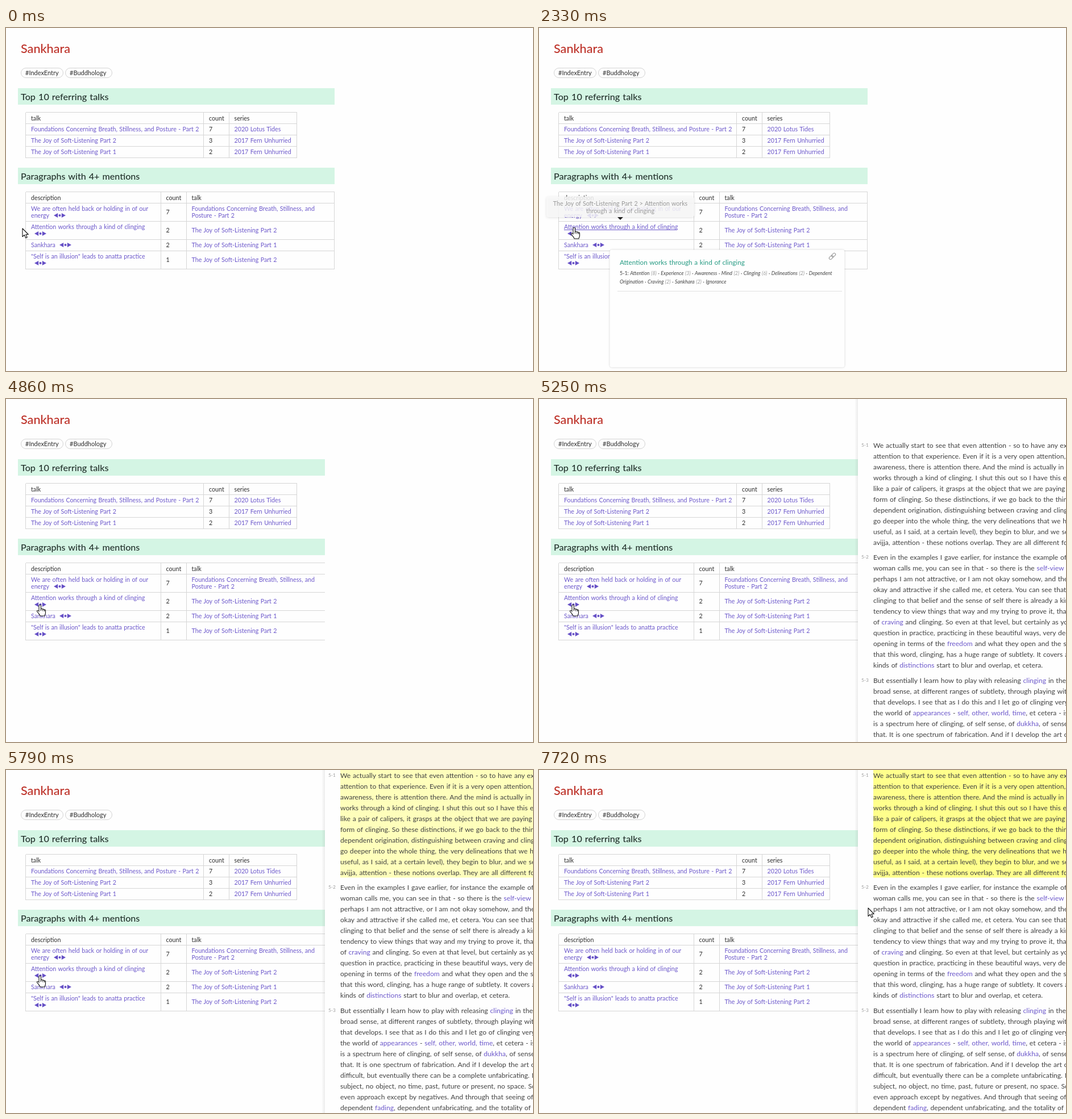
An HTML page for the animation above (8 s loop, 927 by 604 pixels).

```html
<!DOCTYPE html>
<html lang="en">
<head>
<meta charset="utf-8">
<title>Index entry preview</title>
<style>
  html, body { margin: 0; width: 100%; height: 100%; overflow: hidden; background: #fefefe; }
  svg { display: block; width: 100vw; height: 100vh; }
  text { font-family: Lato, "Open Sans", sans-serif; word-spacing: .06em; white-space: pre; fill: #2e2e2e; }
  .prose text { fill: #404040; }
  .link { fill: #6c58cb; }
  .title { fill: #bd3128; font-weight: 500; }
  .head { fill: #22302b; font-weight: 500; }
  .teal { fill: #35a28c; font-weight: 500; }
  text.dim, .dim { fill: #999; }
  .topics { font-style: italic; fill: #444; }
  .upright { font-style: normal; }
  .mid { text-anchor: middle; }
  .end { text-anchor: end; }
  .grid { fill: none; stroke: #d6d6d6; shape-rendering: crispEdges; }
  .band { fill: #d4f5e4; }
  .pill { fill: #fdfdfd; stroke: #d4d4d4; }
  .marks { fill: #6650c6; }
  .tip rect { fill: #fafafa; fill-opacity: .85; filter: drop-shadow(0 1px 2px #0002); }
  .tip path { fill: #222; }
  .chain { fill: none; stroke: #999; stroke-width: 1.1; }
  .cursor { fill: #fff; stroke: #111; stroke-width: 1.1; stroke-linejoin: round; }
</style>
</head>
<body>
<svg id="stage" viewBox="0 0 927 604" preserveAspectRatio="none"></svg>
<script>
const LOOP = 8000;
const TALK = 'The Joy of Soft-Listening Part ';
const LONG = ['Foundations Concerning Breath, Stillness, and', 'Posture - Part 2'];
const CELL = 10.7, BODY = 12.1, POPUP = 10.42;

// [words] become links, (n) becomes a dimmed count
const markup = s => s.replace(/>/g, '&gt;')
  .replace(/\[(.+?)\]/g, '<tspan class="link">$1</tspan>')
  .replace(/\(\d\)/g, '<tspan class="dim">$&</tspan>');
const text = (x, y, size, s, cls = '') =>
  `<text x="${x}" y="${y}" font-size="${size}" class="${cls}">${markup(s)}</text>`;
const cell = (x, y, s) => text(x, y, CELL, s);
const link = (x, y, s) => text(x, y, CELL, s, 'link');
const lines = (x, y, step, size, list) => list.map((s, i) => text(x, y + i * step, size, s)).join('');
const rect = (x, y, w, h, attrs = '') => `<rect x="${x}" y="${y}" width="${w}" height="${h}" ${attrs}/>`;
const group = (id, body, attrs = '') => `<g id="${id}" ${attrs}>${body}</g>`;

const grid = (xs, ys) => {
  const x2 = xs[xs.length - 1], y2 = ys[ys.length - 1];
  const d = xs.map(x => `M${x} ${ys[0]}V${y2}`).concat(ys.map(y => `M${xs[0]} ${y}H${x2}`)).join('');
  return `<path class="grid" d="${d}"/>`;
};
const marks = (x, y) => `<path class="marks" d="M${x} ${y}l7.2 -4v8zM${x + 21} ${y}l-7.2 -4v8z"/>
  <circle class="marks" cx="${x + 10.5}" cy="${y}" r="2"/>`;
const chain = (x, y) => `<g class="chain" transform="translate(${x} ${y}) rotate(-45)">
  <rect x="-7" y="-2.3" width="8" height="4.6" rx="2.3"/><rect x="-1" y="-2.3" width="8" height="4.6" rx="2.3"/></g>`;

const page = [
  text(26, 44, 21.6, 'Sankhara', 'title'),
  rect(26.5, 70.5, 74, 17, 'rx="8.5" class="pill"'), text(34, 83, 11, '#IndexEntry'),
  rect(104.5, 70.5, 82, 17, 'rx="8.5" class="pill"'), text(112, 83, 11, '#Buddhology'),
  rect(21, 106, 557, 29, 'class="band"'), text(26, 126.5, 16.2, 'Top 10 referring talks', 'head'),
  rect(21, 246, 557, 29, 'class="band"'), text(26, 266.5, 16.1, 'Paragraphs with 4+ mentions', 'head'),

  grid([34.5, 347.5, 392.5, 511.5], [148.5, 168.5, 188.5, 208.5, 228.5]),
  cell(44, 162.5, 'talk'), cell(357, 162.5, 'count'), cell(401.5, 162.5, 'series'),
  ...[[LONG.join(' '), 7, '2020 Lotus Tides'], [TALK + 2, 3, '2017 Fern Unhurried'], [TALK + 1, 2, '2017 Fern Unhurried']]
    .map(([talk, n, series], i) => {
      const y = 182 + i * 20;
      return link(44, y, talk) + cell(357, y, '' + n) + link(401.5, y, series);
    }),

  grid([34.5, 272.5, 317.5, 577.5], [288.5, 308.5, 340.5, 372.5, 392.5, 424.5]),
  cell(44, 302.5, 'description'), cell(281.5, 302.5, 'count'), cell(326.5, 302.5, 'talk'),
  link(44, 322, 'We are often held back or holding in of our'), link(44, 334, 'energy'), marks(84, 330),
  cell(281.5, 328, '7'), link(326.5, 322, LONG[0]), link(326.5, 334, LONG[1]),
  link(44, 354, 'Attention works through a kind of clinging'), marks(50, 362),
  cell(281.5, 360, '2'), link(326.5, 360, TALK + 2),
  link(44, 386, 'Sankhara'), marks(94, 382), cell(281.5, 386, '2'), link(326.5, 386, TALK + 1),
  link(44, 406, '"Self is an illusion" leads to anatta practice'), marks(50, 414),
  cell(281.5, 412, '1'), link(326.5, 412, TALK + 2),
].join('');

const topicCard = rect(124.5, 390.5, 413, 207, 'rx="4" fill="#fefefe" style="filter:drop-shadow(0 0 1.5px #0003)"')
  + chain(516, 402)
  + text(142, 417, 11.7, 'Attention works through a kind of clinging', 'teal')
  + `<text x="142" y="435" font-size="8.9" class="topics"><tspan class="upright">5-1:</tspan>${markup(
    ' Attention (8) · Experience (3) · Awareness · Mind (2) · Clinging (6) · Delineations (2) · Dependent')}</text>`
  + text(142, 450, 8.9, 'Origination · Craving (2) · Sankhara (2) · Ignorance', 'topics')
  + '<path class="grid" d="M138 463.5H533" stroke-opacity=".7"/>';

const passage = lines(131, 431, 14.52, POPUP, [
  'We actually start to see that even [attention] - so to have any [experience], I need to in',
  'some way pay attention to that experience. Even if it is a very open attention, I am',
  'attending to the totality, [vast awareness], there is attention there. And the [mind] is',
  'actually in a subtle way [clinging]. Attention works through a kind of clinging. I shut',
  'this out so I have this experience, the mind kind of grasps like a pair of calipers, it',
  'grasps at the object that we are paying attention to. So even attention is a form of',
  'clinging. So these [distinctions], if we go back to the thing about the [twelve links of]',
  '[dependent origination], distinguishing between [craving] and clinging and [sankhara],',
  'et cetera, as we go deeper into the whole thing, the very delineations that we had',
  'started off with (and that are useful, as I said, at a certain level), they begin to blur,',
  'and we see how clinging, craving, sankhara, [avijja], attention - these notions',
  'overlap. They are all different forms of clinging, if you like.']);

const notes = [
  [14, [
    'We actually start to see that even attention - so to have any experience,',
    'attention to that experience. Even if it is a very open attention, I am',
    'awareness, there is attention there. And the mind is actually in a subtle',
    'works through a kind of clinging. I shut this out so I have this experience',
    'like a pair of calipers, it grasps at the object that we are paying attention',
    'form of clinging. So these distinctions, if we go back to the thing about',
    'dependent origination, distinguishing between craving and clinging and',
    'go deeper into the whole thing, the very delineations that we had started',
    'useful, as I said, at a certain level), they begin to blur, and we see how',
    'avijja, attention - these notions overlap. They are all different forms of']],
  [211, [
    'Even in the examples I gave earlier, for instance the example of the',
    'woman calls me, you can see in that - so there is the [self-view] that',
    'perhaps I am not attractive, or I am not okay somehow, and then I am',
    'okay and attractive if she called me, et cetera. You can see that the',
    'clinging to that belief and the sense of self there is already a kind of',
    'tendency to view things that way and my trying to prove it, that is a kind',
    'of [craving] and clinging. So even at that level, but certainly as you',
    'question in practice, practicing in these beautiful ways, very deep',
    'opening in terms of the [freedom] and what they open and the sense',
    'that this word, clinging, has a huge range of subtlety. It covers all',
    'kinds of [distinctions] start to blur and overlap, et cetera.']],
  [428, [
    'But essentially I learn how to play with releasing [clinging] in the very',
    'broad sense, at different ranges of subtlety, through playing with',
    'that develops. I see that as I do this and I let go of clinging very',
    'the world of [appearances] - [self, other, world, time], et cetera - is',
    'is a spectrum here of clinging, of self sense, of [dukkha], of sense of',
    'that. It is one spectrum of fabrication. And if I develop the art of it',
    'difficult, but eventually there can be a complete unfabricating. No',
    'subject, no object, no time, past, future or present, no space. So I',
    'even approach except by negatives. And through that seeing of the',
    'dependent [fading], dependent unfabricating, and the totality of it']],
].map(([y, list], i) => text(567, y - 2, 8.3, `5-${i + 1}`, 'dim') + lines(588, y, 19, BODY, list)).join('');

const tip = (x, y, w, h, arrowX, body) => rect(x, y, w, h, 'rx="4"') + body
  + `<path d="M${arrowX - 5} ${y + h}h10l-5 5z"/>`;

document.getElementById('stage').innerHTML = `
  <defs><linearGradient id="edge"><stop stop-color="#888" stop-opacity=".03"/><stop offset="1" stop-color="#888" stop-opacity=".15"/></linearGradient></defs>
  ${page}
  ${group('underline', '<path d="M44 355.5H243" stroke="#6c58cb" shape-rendering="crispEdges"/>')}
  ${group('tipTitle', tip(13, 297, 260, 36, 143,
    text(143, 312.5, 10.6, TALK + '2 > Attention works', 'mid dim') + text(143, 325.5, 10.6, 'through a kind of clinging', 'mid dim')), 'class="tip"')}
  ${group('cardTopics', topicCard)}
  ${group('tipBlock', tip(-57, 322, 234, 24, 60, text(165, 337, 10.6, TALK + '2 > ^5-1', 'end dim')), 'class="tip"')}
  ${group('cardPassage', rect(112, 404, 414, 200, 'fill="#fefefe" opacity=".96"') + chain(505, 417))}
  ${group('passage', passage, 'class="prose"')}
  ${group('ripple', '<circle cx="60" cy="364" r="8.5" fill="#6a55c9" opacity=".25"/>')}
  ${group('pane', rect(561, 0, 366, 604, 'fill="#fefefe"'))}
  ${group('paneEdge', rect(556, 0, 5, 604, 'fill="url(#edge)"'))}
  ${group('glow', rect(588, 0, 339, 189.5, 'fill="#ffff8c"'))}
  ${group('notes', notes, 'class="prose"')}
  ${group('arrow', '<path d="M0 0V14.5L3.4 11.4L5.8 16.8L8.2 15.8L5.9 10.5H10.3Z"/>', 'class="cursor"')}
  ${group('hand', `<path d="M-2 1C-2 -1 1.5 -1 1.5 1V7C2 6 4.5 6 4.8 7.5C5.5 6.8 7.3 7 7.6 8.5C8.5 7.8 9.5 8.2 9.5 10V14C9.5 16 8 17 8 19H0C0 17 -4 13 -5.5 11C-6 9.3 -4 8.6 -2 11Z"/>
    <path d="M1.5 7v3M4.8 7.5v3M7.6 8.5v2.5" fill="none"/>`, 'class="cursor"')}
  ${group('beam', '<path d="M-3 -8H3M0 -8V8M-3 8H3" stroke="#111"/>')}`;

// Each track holds [time, opacity] pairs; values jump, as in a screen recording
const opacity = {
  underline: [[0, 0], [570, 1], [2600, 0]],
  tipTitle: [[0, 0], [570, .3], [700, .7], [820, 1], [2600, .5], [2720, 0]],
  cardTopics: [[0, 0], [820, .6], [950, 1], [2720, .5], [2840, 0]],
  tipBlock: [[0, 0], [2720, .5], [2840, 1], [4860, 0]],
  cardPassage: [[0, 0], [2960, 1], [4860, 0]],
  passage: [[0, 0], [3110, 1], [4860, 0]],
  ripple: [[0, 0], [4470, 1], [4590, 0]],
  pane: [[0, 0], [4860, 1]],
  paneEdge: [[0, 0], [4980, 1]],
  notes: [[0, 0], [5130, 1]],
  glow: [[0, 0], [5640, .25], [5790, .58], [5920, .75], [6040, .9], [6190, 1]],
};
const scroll = [[0, 72], [5520, 0]];
const pointer = [
  [0, 'arrow', 29, 353], [310, 'arrow', 30, 353], [450, 'arrow', 40, 352],
  [570, 'hand', 62, 349], [700, 'hand', 72, 347], [820, 'hand', 74, 346], [1100, 'hand', 72, 346],
  [1230, 'hand', 70, 346], [1370, 'hand', 68, 347], [1500, 'hand', 67, 347], [1640, 'hand', 66, 348],
  [1790, 'hand', 65, 349], [2030, 'hand', 64, 349], [2180, 'hand', 63, 350], [2330, 'hand', 62, 352],
  [2450, 'hand', 62, 355], [2600, 'hand', 61, 358], [2840, 'hand', 60, 361], [3110, 'hand', 60, 363],
  [6190, 'arrow', 246, 296], [6340, 'arrow', 470, 215], [6460, 'beam', 655, 163], [6600, 'beam', 636, 176],
  [6730, 'beam', 619, 190], [6880, 'arrow', 585, 243], [7180, 'arrow', 584, 243], [7300, 'arrow', 583, 242],
  [7450, 'arrow', 580, 242], [7720, 'arrow', 579, 243],
];

const el = id => document.getElementById(id);
const at = (track, t) => track.reduce((found, step) => step[0] <= t ? step : found);
const start = performance.now();

function draw() {
  const t = (performance.now() - start) % LOOP;
  for (const id in opacity) el(id).setAttribute('opacity', at(opacity[id], t)[1]);
  el('notes').setAttribute('transform', `translate(0 ${at(scroll, t)[1]})`);
  const [, shape, x, y] = at(pointer, t);
  for (const id of ['arrow', 'hand', 'beam']) el(id).setAttribute('opacity', +(id === shape));
  el(shape).setAttribute('transform', `translate(${x} ${y})`);
  requestAnimationFrame(draw);
}
draw();
</script>
</body>
</html>
```
